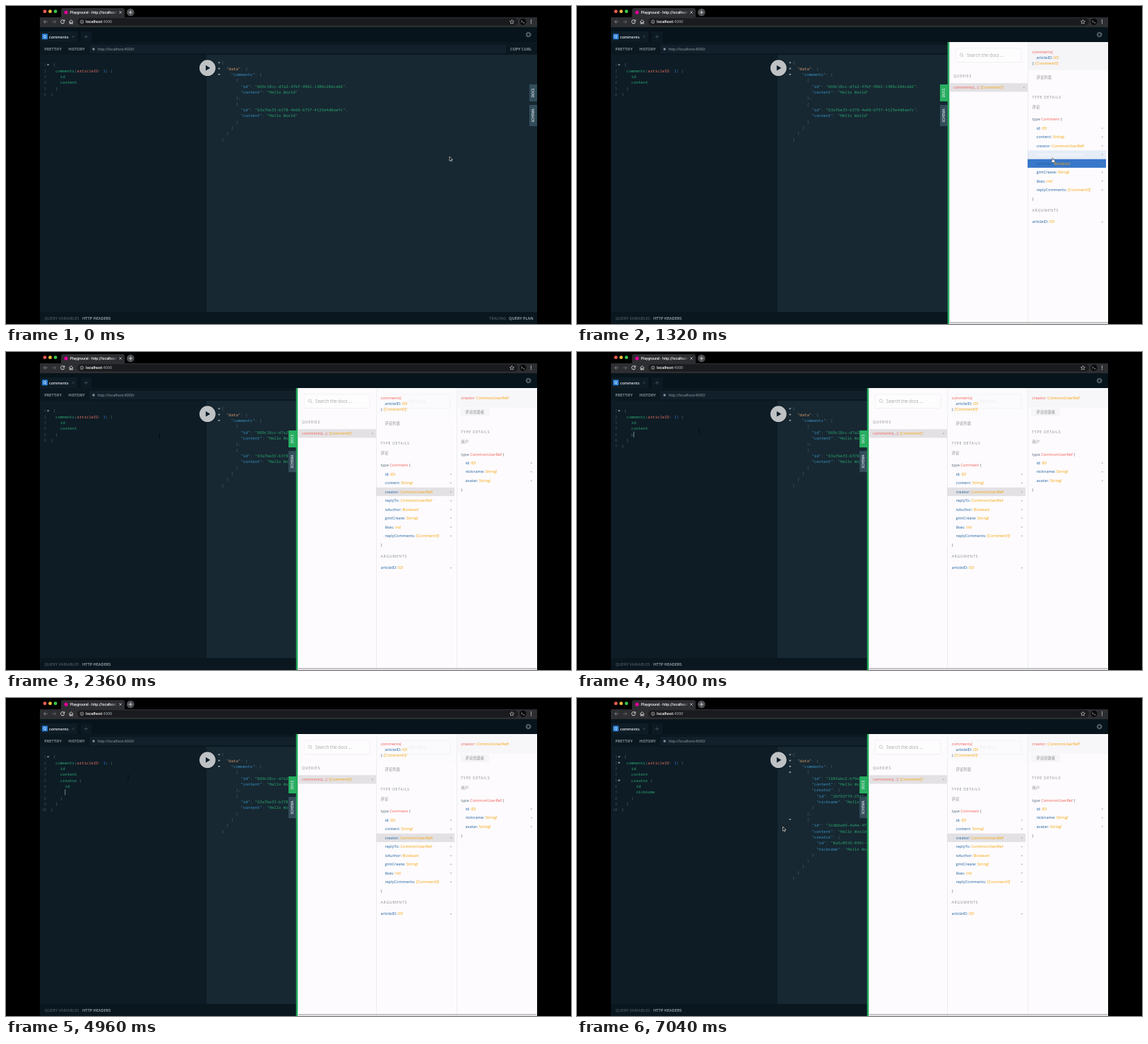
An HTML page that plays this animation: 800x450 px, repeating every 7.08 s.

```html
<!DOCTYPE html>
<html lang="zh">
<head>
<meta charset="utf-8">
<style>
html, body { margin: 0; width: 100%; height: 100%; overflow: hidden; background: #000; }
svg { display: block; width: 800px; height: 450px; }
text { font: 5.6px "Open Sans", "Noto Sans CJK SC", "Noto Sans CJK", sans-serif; white-space: pre; }
.ui { font-weight: 600; }
.chrome { font-family: Roboto, sans-serif; }
.code { font: 5.62px "Noto Sans Mono", monospace; }
.label { font-size: 5.2px; letter-spacing: .7px; }
.hot tspan { fill: #fff; }
</style>
</head>
<body>
<svg id="stage" viewBox="0 0 800 450" xmlns="http://www.w3.org/2000/svg"></svg>
<script>
const LOOP = 7080, OPEN_DOCS = 430, PICK_FIELD = 1660, FOCUS = 2650, RUN = 6320, LOADED = 6520;
const COLUMN = 114, CHAR = 3.375, LINE = 8.32;
const EDITOR = '#0e1c26', RESULT = '#172832', TAB = '#334d5a';
const GREY = '#56646d', GREEN = '#2aa56e', KEY = '#3a92c4', CORAL = '#e0705f', SAND = '#dc9a6c';
const BLUE = '#1f61a0', RED = '#f25c54', ORANGE = '#f5a000', HOVER = '#2369c4';

const rect = (x, y, w, h, fill, more = '') =>
  `<rect x="${x}" y="${y}" width="${w}" height="${h}" fill="${fill}" ${more}/>`;
const circle = (x, y, r, fill, more = '') => `<circle cx="${x}" cy="${y}" r="${r}" fill="${fill}" ${more}/>`;
const path = (d, stroke, width = .8, fill = 'none') =>
  `<path d="${d}" stroke="${stroke}" stroke-width="${width}" fill="${fill}"/>`;
const span = (s, fill) => `<tspan fill="${fill}">${s}</tspan>`;
// y is the middle of the line
const text = (x, y, s, fill, cls = '', more = '') =>
  `<text x="${x}" y="${y + 2}" fill="${fill}" class="${cls}" ${more}>${s}</text>`;
const fold = (x, y) => `<path d="M${x - 1.7} ${y - 1}h3.4l-1.7 2.2z" fill="#a9b4bb"/>`;

function browser() {
  return ['#f45c54', '#f5bd3c', '#37c648'].map((c, i) => circle(55 + i * 7.5, 7.7, 2.4, c)).join('') +
    `<path d="M78 16V6q0-3 3-3h84q3 0 3 3v10z" fill="#2d2e32"/>` +
    circle(85, 9, 2.6, '#e10098') +
    text(90.5, 9, 'Playground - http://localhost:4', 'url(#fade)', 'chrome', 'style="font-size:5.2px;font-weight:500"') +
    path('M160.3 7.3l3.4 3.4m0-3.4l-3.4 3.4', '#ddd', .7) +
    circle(176.3, 9, 5.4, '#4a4c50') + path('M173.6 9h5.4m-2.7-2.7v5.4', '#e8e8e8') +
    rect(48, 16, 704, 14, '#2d2e32') + rect(101, 17.2, 624, 10.2, '#1a1b1e', 'rx="5.1"') +
    path('M58.8 22.3h-5.3m2.5-2.6l-2.6 2.6 2.6 2.6', '#8b8d91') +
    path('M65.2 22.3h5.3m-2.5-2.6l2.6 2.6-2.6 2.6', '#6a6c70') +
    path('M82.2 20.6a2.6 2.6 0 1 0 .4 2.4M82.8 19.4v2.2h-2.2', '#eee', .9) +
    path('M89.2 22.5l3-2.8 3 2.8m-5 -.4v3h1.4v-1.8h1.2v1.8h1.4v-3', '#eee', .8) +
    circle(107.5, 22.3, 2.3, 'none', 'stroke="#ddd" stroke-width=".6"') + path('M107.5 21v.6m0 .5v1.6', '#ddd', .6) +
    text(113, 22.3, span('localhost', '#fff') + span(':4000', '#8d9297'), '', 'chrome', 'style="font-size:5.6px;font-weight:500"') +
    path('M716.3 19.4l.9 2 2.1.2-1.6 1.4.5 2.1-1.9-1.1-1.9 1.1.5-2.1-1.6-1.4 2.1-.2z', '#ddd', .6) +
    circle(732, 22.3, 4.6, '#08090b') + path('M729.6 20.6l1.6 1.4-1.6 1.4m2.4.4h2.4', '#ddd', .7) +
    [20, 22.3, 24.6].map(y => circle(743.5, y, .7, '#eee')).join('');
}

function workspace() {
  return rect(48, 30, 704, 420, '#08141c') +
    rect(48, 36, 53, 15, EDITOR) + rect(51, 39.3, 8, 8, '#2a7ed3', 'rx="1"') +
    text(53, 43.3, 'Q', '#fff', 'ui', 'style="font-size:5px"') +
    text(61, 43.5, 'comments', '#e6eaed', 'ui', 'style="font-size:5.4px"') +
    path('M93.6 42l2.8 2.8m0-2.8l-2.8 2.8', '#4d5c66', .6) +
    rect(106, 36, 15, 15, '#0c1a24') + path('M110.6 43.5h5.4m-2.7-2.7v5.4', '#4b5963', .7) +
    circle(739.7, 40.5, 2.5, 'none', 'stroke="#58656d" stroke-width="1.6"') +
    circle(739.7, 40.5, 3.6, 'none', 'stroke="#58656d" stroke-width="1" stroke-dasharray="1.4 1.43"') +
    rect(48, 51, 704, 20, '#0b1820') + rect(118, 55, 590, 12, '#11202a', 'rx="1"') +
    text(54.3, 61, 'PRETTIFY', '#9aa5ad', 'ui') + text(88.3, 61, 'HISTORY', '#9aa5ad', 'ui') +
    circle(124, 61, 1.7, '#84919a') + text(129.5, 61, 'http://localhost:4000/', '#9aa5ad', '', 'style="font-size:5.2px"') +
    text(714, 61, 'COPY CURL', '#a7b1b8', 'ui') +
    rect(48, 69, 236, 364, EDITOR) + rect(284, 69, 468, 364, RESULT) +
    rect(48, 433, 704, 17, '#0a171f') +
    text(54.5, 442.3, 'QUERY VARIABLES', '#4b5963', 'ui') + text(108, 442.3, 'HTTP HEADERS', '#a7b1b8', 'ui') +
    text(684, 442.3, 'TRACING', '#4b5963', 'ui') + text(712, 442.3, 'QUERY PLAN', '#a7b1b8', 'ui') +
    `<g id="editor"></g><g id="result"></g>` +
    circle(285.3, 87.7, 12.6, EDITOR) + circle(285.3, 87.7, 11.4, '#bfc2c4') +
    `<path d="M282.8 83.8v7.8l6.4-3.9z" fill="${EDITOR}"/>`;
}

const sideTab = (id, y, h, s) => `<rect id="${id}" x="741" y="${y}" width="11" height="${h}" fill="${TAB}"/>` +
  `<text transform="translate(748.4 ${y + h / 2}) rotate(-90)" text-anchor="middle" fill="#e3e9ec" class="ui" style="font-size:4.7px">${s}</text>`;

// Field rows of the docs, in the coordinates of the two-column panel
const rows = [];
function row(x, y, indent, name, type, nameFill = BLUE, width = 111) {
  rows.push({ x, y: y - 6.2, width });
  const i = rows.length - 1;
  return `<g id="row${i}">` + rect(x, y - 6.2, width, 12.2, HOVER, 'fill-opacity="0"') +
    text(x + indent, y, span(name, nameFill) + span(type, ORANGE), '#777') +
    `<path d="M${x + width - 5.7} ${y - 1}l1.8 1-1.8 1z" fill="#999"/></g>`;
}
const fields = (x, list) => list.map(([name, type], i) => row(x, 173 + i * 12.47, 12.5, name + ': ', type)).join('');

function docs() {
  const label = (x, y, s) => text(x, y, s, '#868a8f', 'label');
  const note = (x, y, s) => text(x, y, s, '#8d8d90', '', 'style="font-size:5.4px"');
  const typeHead = (x, y, s) => text(x, y, span('type ', '#55687c') + span(s, RED) + span(' {', '#666'), '');
  const divider = x => rect(x, 51, .7, 399, '#e6e5e8');
  const third = 752;
  return rect(525, 51, 342, 399, '#fdfbfd') + rect(524.7, 51, 2.5, 399, '#27ae60') +
    rect(536, 60, 93, 19.5, '#fefdfe', 'rx="1" stroke="#f0eef1" stroke-width=".8"') +
    circle(544.3, 69, 2.1, 'none', 'stroke="#aaa" stroke-width=".6"') + path('M545.8 70.6l1.8 1.9', '#aaa', .6) +
    text(552, 69.7, 'Search the docs ...', '#a3a5a9', '', 'style="font-size:6.2px"') +
    label(533, 99.3, 'QUERIES') + rect(527.6, 109.2, 110.4, 12.2, '#e3e1e4') +
    row(527.6, 115.3, 5.4, 'comments(...): ', '[Comment!]!', RED, 110.4) +
    divider(638) +
    `<rect id="heading" x="638.7" y="51" width="113.3" height="39.7"/>` +
    `<g id="residue" opacity=".5">${rect(650, 60, 93, 19.5, 'none', 'stroke="#e6e4e8" stroke-width=".7"')}${
      text(684, 69.7, 'the docs ...', '#dddce0', '', 'style="font-size:6.2px"')}</g>` +
    text(644.5, 65.3, 'comments(', RED) +
    text(650.5, 73, span('articleID: ', BLUE) + span('ID!', ORANGE), '') +
    text(644.5, 80.7, span('): ', '#55687c') + span('[Comment!]!', ORANGE), '') +
    note(650.5, 100.8, '评论列表') +
    label(644.5, 128.6, 'TYPE DETAILS') + note(644.5, 142.6, '评论') + typeHead(644.5, 160.4, 'Comment') +
    `<rect id="picked" x="638" y="191.7" width="111" height="12.2" fill="#e3e1e4"/>` +
    fields(638, [['id', 'ID!'], ['content', 'String!'], ['creator', 'CommonUserRef!'], ['replyTo', 'CommonUserRef'],
      ['isAuthor', 'Boolean!'], ['gmtCreate', 'String!'], ['likes', 'Int!'], ['replyComments', '[Comment!]!']]) +
    text(644.5, 272.6, '}', '#666') + label(644.5, 289, 'ARGUMENTS') + row(638, 305.4, 6.5, 'articleID: ', 'ID!') +
    divider(third) + rect(third + .7, 51, 113.3, 27.5, '#f7f6f9') +
    text(third + 6.3, 65.3, span('creator: ', RED) + span('CommonUserRef!', ORANGE), '') +
    rect(third + 5, 79.5, 41, 11.5, '#f6f5f8') + note(third + 12.3, 85, '评论创建者') +
    label(third + 6.3, 112.7, 'TYPE DETAILS') + note(third + 6.3, 126.7, '用户') +
    typeHead(third + 6.3, 144.7, 'CommonUserRef') +
    `<g transform="translate(0 -16)">${fields(third, [['id', 'ID!'], ['nickname', 'String!'], ['avatar', 'String!']])}</g>` +
    text(third + 6.3, 195, '}', '#666') +
    rect(527.6, 447, 338, 2.3, '#c4c3c6', 'rx="1"');
}

const stage = document.getElementById('stage');
stage.innerHTML = `<defs><linearGradient id="fade" gradientUnits="userSpaceOnUse" x1="148" x2="158">
  <stop stop-color="#f1f1f1"/><stop offset="1" stop-color="#f1f1f1" stop-opacity="0"/></linearGradient>
  <clipPath id="page"><rect x="48" y="30" width="704" height="420"/></clipPath></defs>
  ${rect(0, 0, 800, 450, '#000')}${browser()}${workspace()}
  <g clip-path="url(#page)"><g id="tabs">${sideTab('docsTab', 111, 24, 'DOCS')}${sideTab('schemaTab', 140, 30, 'SCHEMA')}</g>
  <g id="docs">${docs()}</g></g>
  <g id="arrow">${path('M0 0v6.2l1.4-1.3 1 2.1 1-.5-1-2h1.9z', '#fff', .6, '#000')}</g>
  <g id="hand">${path('M-.6-.8q.6-.7 1.2 0v2l2.2.6q.7.3.6 1l-.5 2.6h-3.2l-1.9-2.6q.3-.9 1.6 0z', '#222', .5, '#fff')}</g>
  <g id="beam">${path('M-1-3l1 .6 1-.6M0-2.4v4.8M-1 3l1-.6 1 .6', '#02070b', .7)}</g>`;
const $ = id => document.getElementById(id);
const rowNodes = rows.map((_, i) => $('row' + i));
rows.slice(-3).forEach(r => r.y -= 16);

const item = (id, nickId) => ({ id, content: 'Hello World', ...(nickId && { creator: { id: nickId, nickname: 'Hello World' } }) });
function resultView(comments, foldDepth) {
  return JSON.stringify({ data: { comments } }, null, 2).split('\n').map((line, i) => {
    const y = 80.4 + i * LINE, code = line.trimStart(), indent = line.length - code.length;
    const keyFill = indent === 2 ? SAND : KEY;
    const body = code.replace(/"[^"]*"(:?)|[^"]+/g, (s, colon) =>
      s[0] !== '"' ? span(s, GREY) : colon ? span(s.slice(0, -1), keyFill) + span(':', GREY) : span(s, GREEN));
    const foldable = /[{[]$/.test(code) && indent / 2 <= foldDepth;
    return text(305.2 + indent * CHAR, y, body, '', 'code') + (foldable ? fold(301.7, y) : '');
  }).join('');
}
const before = resultView([item('669c18cc-d7a2-47bf-99b1-1306c28dcdd2'), item('63a7be33-b378-4e68-b757-4125e4d8aefc')], 2);
const after = resultView([
  item('1683abc2-bf9e-4c1d-8a27-5be0193c7f46', '2bf92f74-25a1-4d3e-9c60-71f8b2e4a05d'),
  item('3cd6ba69-4a4e-4f17-b5d2-90ce36a18f7b', '8a5c0916-8961-4e2b-a7f3-1d64c80b95e2')], 3);

// [start, keys, delay between keys]
const typing = [[2950, '\n', 0], [3380, 'creator', 95], [4080, ' {', 100], [4320, '\n', 0],
  [4560, 'id', 110], [4880, '\n', 0], [5080, 'nickname', 85]];

function editorView(t) {
  let typed = '', lastKey = FOCUS;
  for (const [start, keys, delay] of typing) [...keys].forEach((key, i) => {
    if (t >= start + i * delay) { typed += key; lastKey = start + i * delay; }
  });
  const added = typed.split('\n').slice(1).map((s, i) => ' '.repeat(i ? 6 : 4) + s);
  const lines = [' {', '  comments(articleID: 1) {', '    id', '    content', ...added];
  const caretLine = lines.length - 1, caretColumn = lines[caretLine].length;
  if (added.length > 1) lines.push('    }');
  else if (typed.includes('{')) lines[caretLine] += '}';
  lines.push('  }', '}');
  const yOf = i => 83.4 + i * LINE;
  let out = lines.map((line, i) => {
    const body = line.trimStart().replace(/(\w+)(:?)|\W+/g, (s, word, colon) =>
      !word ? span(s, GREY) : colon ? span(word, CORAL) + span(':', GREY) : span(s, /\d/.test(s) ? '#2882f9' : GREEN));
    const foldable = i === 0 || t > 5850 && line.endsWith('{');
    return text(63.3 + (line.length - line.trimStart().length) * CHAR, yOf(i), body, '', 'code') +
      text(57, yOf(i), i + 1, '#42515b', 'code', 'text-anchor="end" style="font-size:4.8px"') +
      (foldable ? fold(59.6, yOf(i)) : '');
  }).join('');
  if (t >= FOCUS && t < RUN && (t - lastKey) % 1060 < 530)
    out += rect(63.3 + caretColumn * CHAR, yOf(caretLine) - 4, .6, 8, '#c5ccd1');
  return out;
}

const mouse = [[0, 628, 213], [60, 628, 213], [420, 744.5, 118], [640, 744.5, 118], [1100, 680, 228], [1228, 673, 226],
  [1460, 674, 198], [1740, 679, 198], [2500, 173, 112], [5850, 173, 112], [6250, 286, 88], [6400, 286, 88],
  [6900, 291.5, 182], [LOOP, 291.5, 182]];
function mouseAt(t) {
  const i = Math.max(1, mouse.findIndex(k => k[0] > t));
  const [t0, x0, y0] = mouse[i - 1], [t1, x1, y1] = mouse[i];
  const p = Math.min(1, Math.max(0, (t - t0) / (t1 - t0))), e = p * p * (3 - 2 * p);
  return [x0 + (x1 - x0) * e, y0 + (y1 - y0) * e];
}
const shiftAt = t => t >= PICK_FIELD ? COLUMN : 0;
function hoveredRow(t) {
  if (t < OPEN_DOCS) return -1;
  const [x, y] = mouseAt(t), local = x + shiftAt(t);
  return rows.findIndex(r => local >= r.x && local < r.x + r.width && y >= r.y && y < r.y + 12.47);
}

function setHTML(node, html) {
  if (node.shown !== html) node.innerHTML = node.shown = html;
}
const show = (id, on) => $(id).setAttribute('visibility', on ? 'visible' : 'hidden');

function draw(t) {
  const open = t >= OPEN_DOCS, shift = shiftAt(t);
  setHTML($('editor'), editorView(t));
  setHTML($('result'), t < LOADED ? before : after);
  $('docs').setAttribute('display', open ? 'inline' : 'none');
  $('docs').setAttribute('transform', `translate(${-shift} 0)`);
  $('tabs').setAttribute('transform', `translate(${open ? -227 - shift : 0} 0)`);
  $('docsTab').setAttribute('fill', open ? '#27ae60' : TAB);
  $('picked').setAttribute('fill-opacity', shift ? 1 : 0);
  $('heading').setAttribute('fill', shift ? '#fbfafc' : '#f5f4f7');
  $('residue').setAttribute('display', shift ? 'inline' : 'none');

  // Row backgrounds fade over 100 ms, text colours switch at once
  const recent = Array.from({ length: 10 }, (_, k) => hoveredRow(t - k * 10));
  rowNodes.forEach((node, i) => {
    node.setAttribute('class', recent[0] === i ? 'hot' : '');
    node.firstChild.setAttribute('fill-opacity', recent.filter(r => r === i).length / 10);
  });

  const [x, y] = mouseAt(t);
  const onPlay = Math.hypot(x - 285.3, y - 87.7) < 12;
  const onTab = !open && x > 741 && y > 111 && y < 135;
  const kind = recent[0] >= 0 || onPlay || onTab ? 'hand' : x > 63 && x < 284 && y > 71 ? 'beam' : 'arrow';
  for (const id of ['arrow', 'hand', 'beam']) show(id, id === kind);
  $(kind).setAttribute('transform', `translate(${x} ${y})`);
}

const begin = performance.now();
function tick() {
  draw((performance.now() - begin) % LOOP);
  requestAnimationFrame(tick);
}
tick();
</script>
</body>
</html>
```
